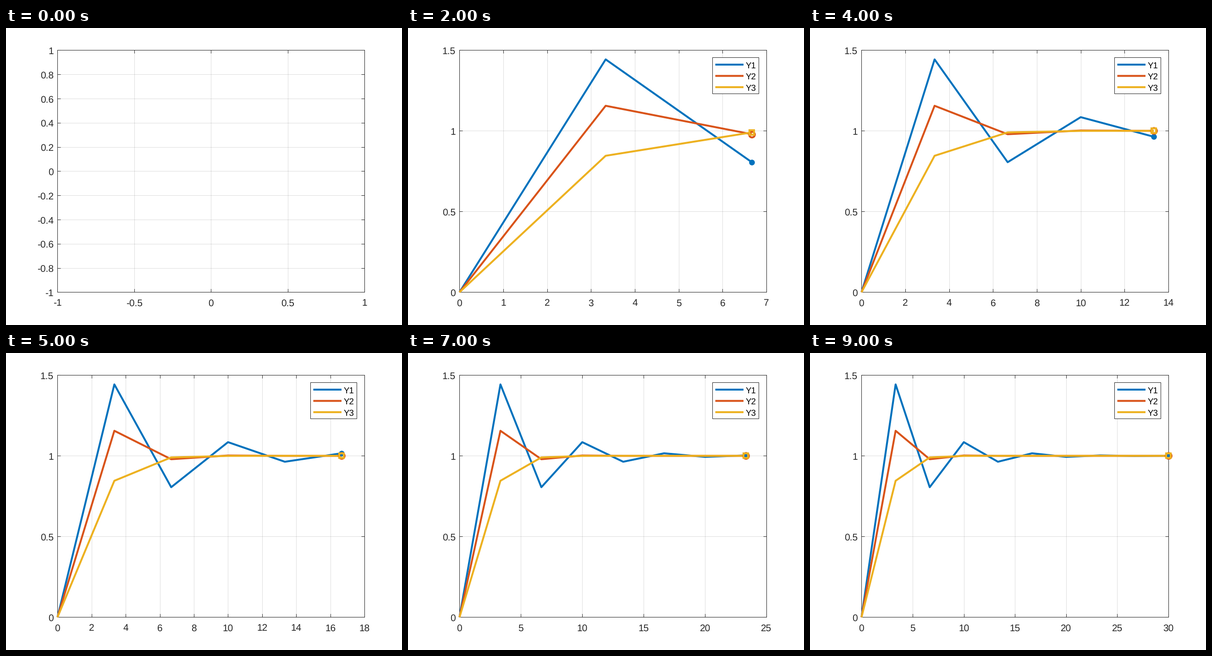
These frames come from a looping animation (864 by 648 pixels, 10 s). A matplotlib script:

```python
import numpy as np
import matplotlib.pyplot as plt
from matplotlib.animation import FuncAnimation
from matplotlib.patches import Rectangle

W, H, DPI = 864, 648, 150
LEFT, RIGHT, TOP, BOTTOM = 112.4, 782.0, 48.3, 576.45
INK = "#262626"
BLUE, ORANGE, YELLOW = "#0072BD", "#D95319", "#EDB120"
COLORS = (BLUE, ORANGE, YELLOW)
LINE_WIDTH = 2

# upper x limit and tick step for each number of drawn segments
X_AXIS = [(3.5, 0.5), (7, 1), (10, 2), (14, 2), (18, 2),
          (20, 5), (25, 5), (30, 5), (30, 5)]

plt.rcParams["font.family"] = "Liberation Sans"
plt.rcParams["text.hinting"] = "none"


def step_response(t, zeta):
    """Unit step response of a second-order system with natural frequency 1."""
    if zeta == 1:
        return 1 - (1 + t) * np.exp(-t)
    wd = np.sqrt(1 - zeta**2)
    return 1 - np.exp(-zeta * t) * (np.cos(wd * t) + zeta / wd * np.sin(wd * t))


time = np.linspace(0, 30, 10)
curves = [step_response(time, zeta) for zeta in (0.25, 0.5, 1)]

fig = plt.figure(figsize=(W / DPI, H / DPI), dpi=DPI, facecolor="white")
ax = fig.add_axes([LEFT / W, 1 - BOTTOM / H,
                   (RIGHT - LEFT) / W, (BOTTOM - TOP) / H])
page = fig.add_axes([0, 0, 1, 1])  # pixel coordinates, y pointing down


def ticks(low, high, step):
    return low + step * np.arange(round((high - low) / step) + 1)


def tick_label(value):
    return f"{round(value, 6) + 0.0:g}"


def draw_axes(xlim, xstep, ylim, ystep):
    xt, yt = ticks(*xlim, xstep), ticks(*ylim, ystep)
    ax.set(xlim=xlim, ylim=ylim, xticks=xt, yticks=yt)
    ax.set_axisbelow(True)
    ax.grid(True, color=INK, alpha=0.15, linewidth=0.5)
    ax.tick_params(direction="in", length=3.2, width=0.5, color=INK,
                   top=True, right=True, labelbottom=False, labelleft=False)
    for spine in ax.spines.values():
        spine.set(color=INK, linewidth=0.5)

    for v in xt:
        x = LEFT + (v - xlim[0]) / (xlim[1] - xlim[0]) * (RIGHT - LEFT)
        page.text(x, 606.5, tick_label(v), size=10, color=INK,
                  ha="center", va="baseline")
    for v in yt:
        y = BOTTOM - (v - ylim[0]) / (ylim[1] - ylim[0]) * (BOTTOM - TOP)
        page.text(103.8, y + 8.4, tick_label(v), size=10, color=INK,
                  ha="right", va="baseline")


def draw_curves(n):
    for y, color in zip(curves, COLORS):
        ax.plot(time[:n + 1], y[:n + 1], color=color, lw=LINE_WIDTH, zorder=3,
                clip_on=False, solid_capstyle="butt", solid_joinstyle="round")

    styles = (dict(marker="o", ms=6, mfc=BLUE, mew=0),
              dict(marker="o", ms=6, mfc="none", mew=LINE_WIDTH),
              dict(marker="s", ms=4.7, mfc="none", mew=LINE_WIDTH))
    for y, color, style in zip(curves, COLORS, styles):
        ax.plot(time[n], y[n], mec=color, ls="none", zorder=4,
                clip_on=False, **style)


def draw_legend():
    page.add_patch(Rectangle((664.4, 64.4), 101, 78.9, facecolor="white",
                             edgecolor=INK, linewidth=0.5))
    for i, color in enumerate(COLORS):
        y = 79.9 + 24.6 * i
        page.plot([670.5, 732], [y, y], color=color, lw=LINE_WIDTH,
                  solid_capstyle="butt", snap=False)
        page.text(736.8, y + 7.8, f"Y{i + 1}", size=9, color="black",
                  ha="left", va="baseline")


def update(frame):
    ax.clear()
    page.clear()
    page.axis("off")
    page.set(xlim=(0, W), ylim=(H, 0))
    if frame == 0:
        draw_axes((-1, 1), 0.5, (-1, 1), 0.2)
        return []
    xmax, xstep = X_AXIS[frame - 1]
    draw_axes((0, xmax), xstep, (0, 1.5), 0.5)
    draw_curves(frame)
    draw_legend()
    page.set(xlim=(0, W), ylim=(H, 0))
    return []


anim = FuncAnimation(fig, update, frames=10, interval=1000, repeat=True)
plt.show()
```
